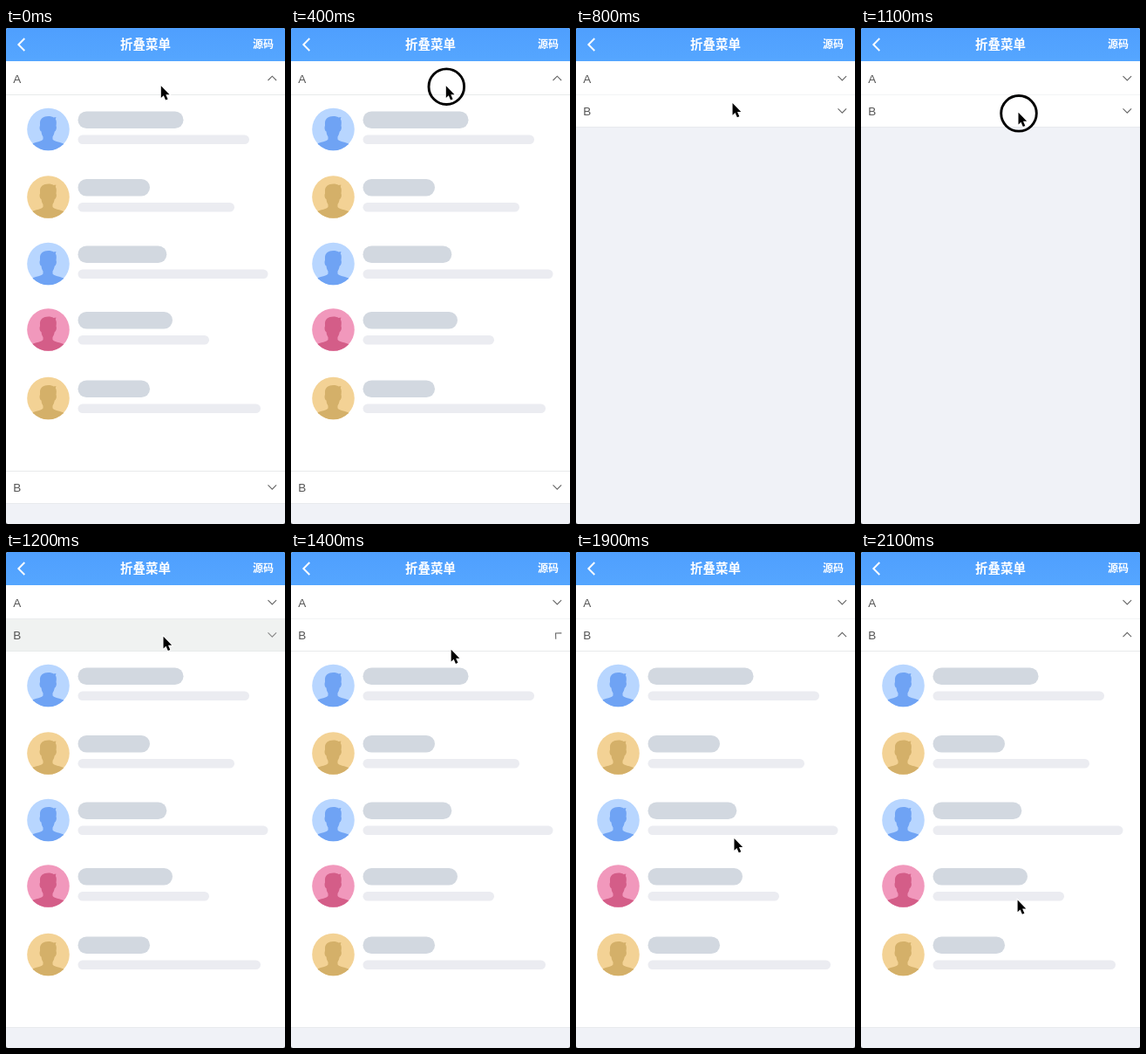
Recreate the animation shown at these times as an HTML page. Size 320 px wide and 568 px high, loop 2200 ms.

```html
<!DOCTYPE html>
<html lang="zh">
<head>
<meta charset="utf-8">
<style>
  html, body { margin: 0; width: 100%; height: 100%; overflow: hidden; background: #444; }
  svg { display: block; width: 320px; height: 568px; border-radius: 2.5px; }
  text { font: 13.5px "Liberation Sans", Arial, sans-serif; fill: #555; }
  .bar { font: bold 14.5px "Noto Sans CJK SC", "Noto Sans CJK", sans-serif; fill: #fff; }
  .small { font-size: 12px; }
  .arrow { fill: none; stroke: #666; stroke-width: 1.1; }
</style>
</head>
<body>
<svg viewBox="0 0 320 568">
  <defs>
    <linearGradient id="blue" x2="0" y2="1">
      <stop stop-color="#4f9ffe"/><stop offset="1" stop-color="#55a6ff"/>
    </linearGradient>
    <clipPath id="disc"><circle r="24.3"/></clipPath>
    <path id="person" clip-path="url(#disc)" d="M-9.5-6C-10-12-6-15 0-15C3-15 4.500-14.500 6-13.500L9-14L8.300-11.500C9.800-9.500 9.300-6.500 9-4C10-2 9 2 7.300 2.500C6.800 5 6 7 5 8.500V11.500C8 15 17 14.500 20.500 18.500V26H-21.500V18.500C-18 14.500-9 15-6 11.500V8.500C-7 7-7.800 5-8 2.500C-9.800 2-10.500-2-9.500-4Z"/>
  </defs>
  <rect width="320" height="568" fill="#f0f2f7"/>
  <g id="list"><rect y="76" width="320" height="431" fill="#fff"/></g>
  <g id="rows"></g>
  <rect id="foot" width="320" height="1" fill="#e8eaee"/>
  <rect width="320" height="38" fill="url(#blue)"/>
  <path d="M21.300 12L14.300 19L21.300 26" fill="none" stroke="#fff" stroke-width="1.9"/>
  <text class="bar" x="160" y="24.300" text-anchor="middle">折叠菜单</text>
  <text class="bar small" x="307" y="23.300" text-anchor="end">源码</text>
  <g id="mouse">
    <circle id="ring" cx=".5" cy="1" r="20.300" fill="none" stroke="#000" stroke-width="2.900"/>
    <path d="M0 0V13.800L3 11L5.300 16.300L7.800 15.200L5.500 10H9.700Z" stroke="#fff" stroke-width="1.800" paint-order="stroke"/>
  </g>
</svg>
<script>
const $ = id => document.getElementById(id);
const LOOP = 2200, STEP = 100, CLOSE = 500, OPEN = 1200, HEIGHT = 431;

const tones = {
  blue: ['#b8d6ff', '#6fa3f4'],
  tan: ['#f3d295', '#d4b069'],
  pink: ['#f198bc', '#d45d88']
};
// tone, centre y, right ends of the two bars
const people = [
  ['blue', 116, 203.5, 279],
  ['tan', 193.5, 165, 262],
  ['blue', 270, 184.3, 300.5],
  ['pink', 345.5, 191, 233],
  ['tan', 424, 165, 292]
];
const pill = (y, h, right, fill) =>
  `<rect x="82.5" y="${y}" width="${right - 82.5}" height="${h}" rx="${h / 2}" fill="${fill}"/>`;

$('list').innerHTML += people.map(([tone, y, name, note]) => {
  const [back, front] = tones[tone];
  return `<g transform="translate(48.5 ${y})"><circle r="24.3" fill="${back}"/>
    <use href="#person" fill="${front}"/></g>` +
    pill(y - 20.5, 19.5, name, '#d2d8e0') + pill(y + 6.5, 10.5, note, '#ebecf1');
}).join('');

$('rows').innerHTML = ['A', 'B'].map((name, i) => `<g>
  <rect width="320" height="${38 - i * .5}"/>
  <rect y="${38 - i}" width="320" height="1" fill="#e8eaeb"/>
  <text x="8.3" y="${24.5 - i * .8}">${name}</text>
  <path class="arrow" d="M-4.800-2.400L0 2.400L4.800-2.400"/></g>`).join('');
const rows = [...$('rows').children];

const smooth = p => {
  p = Math.min(1, Math.max(0, p));
  return p * p * (3 - 2 * p);
};

// time, x, y of the pointer
const path = [
  [0, 177.8, 66.2], [500, 177.8, 66.2], [1000, 180.5, 96.8],
  [1200, 180.5, 96.8], [1600, 186.8, 126.5], [2050, 179.6, 398.5], [LOOP, 179.6, 398.5]
];
function pointer(t) {
  const i = path.findIndex(k => k[0] > t);
  const [t0, x0, y0] = path[i - 1], [t1, x1, y1] = path[i];
  const p = smooth((t - t0) / (t1 - t0));
  return [x0 + (x1 - x0) * p, y0 + (y1 - y0) * p];
}

function drawRow(i, y, angle, pressed) {
  const [box, , , arrow] = rows[i].children;
  rows[i].setAttribute('transform', `translate(0 ${y})`);
  box.setAttribute('fill', pressed ? '#f0f2f1' : '#fff');
  arrow.setAttribute('transform', `translate(305.3 ${19.6 - i * .9}) rotate(${angle})`);
  arrow.style.stroke = pressed ? '#888' : '#666';
}

function draw(now) {
  const t = Math.floor(now % LOOP / STEP) * STEP;
  const openA = t < CLOSE, openB = t >= OPEN;
  const turn = start => 180 * smooth((t - start) / 300);

  $('list').setAttribute('display', openA || openB ? 'inline' : 'none');
  $('list').setAttribute('transform', `translate(0 ${openB ? 37 : 0})`);
  drawRow(0, 38, 180 - turn(CLOSE), t === CLOSE);
  drawRow(1, openA ? 76 + HEIGHT : 76, turn(OPEN), t === OPEN);
  rows[1].children[0].setAttribute('y', .5);
  $('foot').setAttribute('y', openA || openB ? 113 + HEIGHT : 113);
  // divider above the second row
  rows[0].children[1].setAttribute('y', 38);
  rows[1].children[1].setAttribute('y', openA ? 0 : 37);

  $('mouse').setAttribute('transform', `translate(${pointer(t)})`);
  $('ring').setAttribute('display', t === CLOSE - STEP || t === OPEN - STEP ? 'inline' : 'none');
  requestAnimationFrame(draw);
}
draw(0);
</script>
</body>
</html>
```
